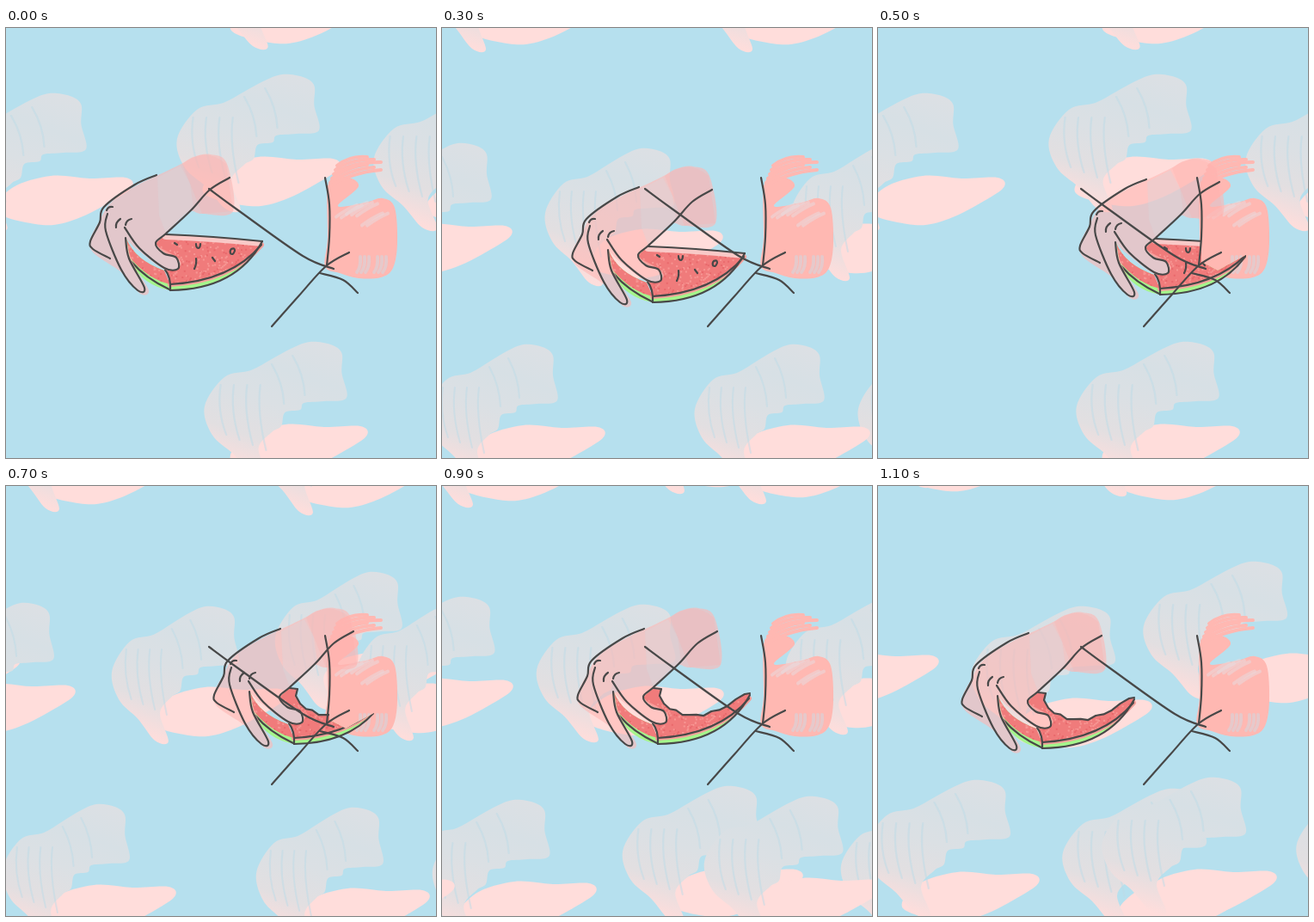
An HTML page with a canvas that plays this animation: 500x500 px, repeating every 1.2 s.

```html
<!DOCTYPE html>
<html lang="en">
<head>
<meta charset="utf-8">
<title>Watermelon</title>
<style>
html, body { margin: 0; width: 100%; height: 100%; overflow: hidden; background: #b6e0ee; }
canvas { display: block; width: 500px; height: 500px; }
</style>
</head>
<body>
<canvas id="stage" width="500" height="500"></canvas>
<script>
const ctx = document.getElementById('stage').getContext('2d');
const SIZE = 500, STEP = 100, STEPS = 12, BITE = 6;
const SKY = '#b6e0ee', INK = '#484848', BLUSH = '#ffdddb', PINK = '#ffb8b2';

let seed = 7;
const random = () => (seed = seed * 16807 % 2147483647) / 2147483647;
const repeat = (length, make) => Array.from({ length }, (_, i) => make(i));
const line = d => new Path2D(d);

// Smooth path that passes through the key points "x,y x,y ...".
function curve(text, closed = false) {
  const pts = text.trim().split(/\s+/).map(p => p.split(',').map(Number));
  const n = pts.length;
  const at = i => closed ? pts[(i + n) % n] : pts[Math.max(0, Math.min(n - 1, i))];
  const path = new Path2D();
  path.moveTo(...pts[0]);
  for (let i = 0; i < (closed ? n : n - 1); i++) {
    const [a, b, c, d] = [-1, 0, 1, 2].map(k => at(i + k));
    path.bezierCurveTo(b[0] + (c[0] - a[0]) / 6, b[1] + (c[1] - a[1]) / 6,
      c[0] - (d[0] - b[0]) / 6, c[1] - (d[1] - b[1]) / 6, ...c);
  }
  if (closed) path.closePath();
  return path;
}

function fill(path, style) {
  ctx.fillStyle = style;
  ctx.fill(path);
}

function stroke(paths, style = INK, width = 2.2) {
  ctx.strokeStyle = style;
  ctx.lineWidth = width;
  paths.forEach(p => ctx.stroke(p));
}

// Pale hands: origin at the top of the wrist. Pale slices: origin at the tip.
const paleHand = curve(`0,0 22,3 34,13 34,36 39,65 15,69 -6,71 -10,79 -26,82 -30,98 -40,105
  -54,124 -44,157 -60,156 -80,131 -103,108 -111,75 -90,41 -62,33 -40,20 -20,8`, true);
const paleSlice = curve('0,0 -8,-10 -50,-9 -95,-12 -140,2 -158,30 -105,45 -65,38 -20,15', true);
const paleStreaks = [
  ...repeat(4, i => line(`M${-94 + 14 * i} 50 q-4 30 6 ${58 + 6 * i}`)),
  ...repeat(2, i => line(`M${-18 - 22 * i} ${16 + 10 * i} q12 22 13 46`))
];
const paleShade = ctx.createLinearGradient(10, 0, -50, 160);
['#dce0e4', '#d7e0e5', '#dbe0e4', '#e2dfe1', BLUSH].forEach((c, i) => paleShade.addColorStop(i / 4, c));

// Backdrops in turn: hand width, tip drop, hands as [x, y, tip reach].
const backdrops = [
  { wide: 1.1, drop: 108, hands: [[321, 54, 67], [353, 365, 67], [50, 76, 97]] },
  { wide: 1.11, drop: 119, hands: [[232, 140, 86], [432, 88, 138], [110, 342, 77], [338, 352, 100], [384, 339, 79]] },
  { wide: .98, drop: 106, hands: [[232, 140, 94], [422, 100, 94], [17, 136, 63], [105, 370, 92], [400, 374, 92]] },
  { wide: 1, drop: 106, hands: [[231, 140, 95], [18, 134, 63], [95, 368, 94], [405, 368, 92]] },
  { wide: 1.07, drop: 107, hands: [[229, 138, 98], [19, 129, 63], [83, 365, 96], [329, 349, 90], [424, 361, 90]] }
];

// The backdrop wraps around the stage edges.
function drawBackdrop({ wide, drop, hands }) {
  for (const [x, y, reach] of hands)
    for (const ox of [-SIZE, 0, SIZE]) for (const oy of [-SIZE, 0]) {
      ctx.save();
      ctx.translate(x + ox + reach, y + oy + drop);
      fill(paleSlice, BLUSH);
      ctx.translate(-reach, -drop);
      ctx.scale(wide, 1);
      fill(paleHand, paleShade);
      stroke(paleStreaks, 'rgba(190,220,232,.5)', 2);
      ctx.restore();
    }
}

// Slice, in the coordinates of the resting hand.
const grip = 'L191 305 Q192 290 185 281 L196 281 Q208 277 198 266 Q180 262 174 250 Z';
const biteEdge = repeat(12, i => {
  const u = i / 11, v = 1 - u;
  const wobble = u < 1 ? 1.5 * Math.sin(i * 2.4) : 0;
  return `${198 * v * v + 470 * u * v + 292 * u * u} ${258 * v * v + 580 * u * v + 247 * u * u + wobble}`;
}).join(' ');

function makeSlice(top) {
  return {
    top: line(top),
    rind: line(`${top} Q268 304 191 305 ${grip}`),
    flesh: line(`${top} L297 252 Q262 294 191 298 ${grip}`)
  };
}
const whole = makeSlice('M186 240 Q240 242 298 248');
const bitten = makeSlice(`M186 240 L195 241 193 249 ${biteEdge} L298 246`);
const gapRind = line('M140 245 Q150 270 184 282 L191 305 Q160 300 144 272 Z');
const gapFlesh = line('M140 245 Q150 270 184 282 L191 298 Q165 292 144 267 Z');
const innerRim = line('M297 252 Q262 294 191 298');
const sliceLines = [innerRim, line('M298 248 Q268 304 191 305'),
  line('M185 281 Q192 290 191 305'), line('M146 272 Q162 291 190 304')];
const seeds = [line('M196 250 l3 2'), line('M221 251 q0 5 3 5 q2 -1 2 -5'),
  line('M221 268 q1 6 -2 12'), line('M240 267 l3 4'),
  line('M262 257 q4 -2 4 2 q-2 6 -5 3 q-1 -3 1 -5')];
const specks = repeat(450, () => [140 + random() * 158, 240 + random() * 62, random() < .65]);

function drawSlice(slice, isWhole) {
  for (const p of [slice.rind, gapRind]) fill(p, '#a5f58c');
  stroke([innerRim], '#f3a09b', 6);
  for (const p of [slice.flesh, gapFlesh]) {
    fill(p, '#f07b7b');
    ctx.save();
    ctx.clip(p);
    for (const [x, y, light] of specks) {
      ctx.fillStyle = light ? '#f79693' : '#e9696c';
      ctx.fillRect(x, y, 2, 2);
    }
    if (isWhole) stroke([slice.top], '#f9c9c7', 12);
    ctx.restore();
  }
  stroke([...sliceLines, slice.top, ...(isWhole ? seeds : [])]);
}

// Hand holding the slice.
const handFill = curve(`238,147 257,158 264,213 228,216 212,214 186,239 174,251 198,266 203,276
  185,281 152,257 139,246 150,278 166,305 156,309 134,284 98,256 110,222 124,201 152,183 200,160
  218,150`, true);
const palm = line('M176 174 L203 160 214 181 218 208 186 239 178 218 Z');
const cuff = line('M205 158 Q232 137 256 158 L264 213 228 216 Z');
const handLines = [
  curve('175,171 150,182 114,208 109,226 98,248 101,257 121,268'),
  curve('118,216 116,236 134,281 153,305 161,302 143,268 139,244'),
  curve('138,232 155,256 184,279 200,280 198,267 183,262 174,250 186,239 215,212 237,188 260,174'),
  line('M117 212 q2 -5 7 -4'), line('M128 232 q-1 -6 5 -10'), line('M139 229 q1 -6 7 -7')
];

function drawHand() {
  fill(handFill, 'rgba(255,184,180,.6)');
  fill(palm, 'rgba(214,214,220,.35)');
  fill(cuff, 'rgba(255,170,162,.22)');
  stroke(handLines);
}

// Head and body.
const face = curve(`375,181 395,173 410,184 386,207 418,203 438,198 452,209 455,250 450,279
  436,290 410,291 388,285 371,277 374,244`, true);
const hair = repeat(6, i => line(`M${385 - 2 * i} ${160 + 5 * i} Q400 ${148 + 4 * i} ${420 + 8 * (i % 3)} ${150 + 3 * i}`));
const faceStreaks = repeat(7, i => line(`M${384 + 6 * i} ${214 + 16 * random()} q12 -9 24 -14`));
const chinStreaks = repeat(6, i => line(`M${408 + 5 * i + 5 * (i > 2)} 284 q5 -6 4 -18`));
const bodyLines = [
  curve('371,174 376,205 376,243 373,276'),
  curve('236,187 270,212 345,265 381,280'),
  curve('309,347 340,312 372,277 399,261'),
  curve('365,285 392,293 409,308')
];

function drawHead() {
  fill(face, PINK);
  stroke(hair, PINK, 4);
  stroke(faceStreaks, 'rgba(232,219,224,.5)', 4);
  stroke(chinStreaks, 'rgba(205,218,228,.5)', 4);
}

// Reach of the hand: [step, x, y], with straight moves between.
const mouthClip = line('M0 0 H376 V272 L395 282 428 264 V310 L300 500 H0 Z');
const reaches = [[0, 0, 0], [2, 33, 11], [4, 74, 17], [5, 137, 5], [7, 144, -5], [9, 60, -5], [11, 0, 0]];

function handAt(step) {
  const i = Math.max(1, reaches.findIndex(r => r[0] >= step));
  const [a, b] = [reaches[i - 1], reaches[i]];
  const u = (step - a[0]) / (b[0] - a[0]);
  return [1, 2].map(k => Math.round(a[k] + (b[k] - a[k]) * u));
}

function draw(step) {
  const [x, y] = handAt(step);
  const isWhole = step < BITE;
  ctx.fillStyle = SKY;
  ctx.fillRect(0, 0, SIZE, SIZE);
  drawBackdrop(backdrops[step % backdrops.length]);
  drawHead();

  ctx.save();
  if (x > 120) ctx.clip(mouthClip);
  ctx.translate(x, y);
  drawSlice(isWhole ? whole : bitten, isWhole);
  ctx.restore();

  ctx.save();
  ctx.translate(x, y);
  drawHand();
  ctx.restore();
  stroke(bodyLines);
}

ctx.lineCap = ctx.lineJoin = 'round';
const start = performance.now();
let shown = -1;
function tick() {
  const step = Math.floor((performance.now() - start) / STEP) % STEPS;
  if (step !== shown) draw(shown = step);
  requestAnimationFrame(tick);
}
tick();
</script>
</body>
</html>
```
